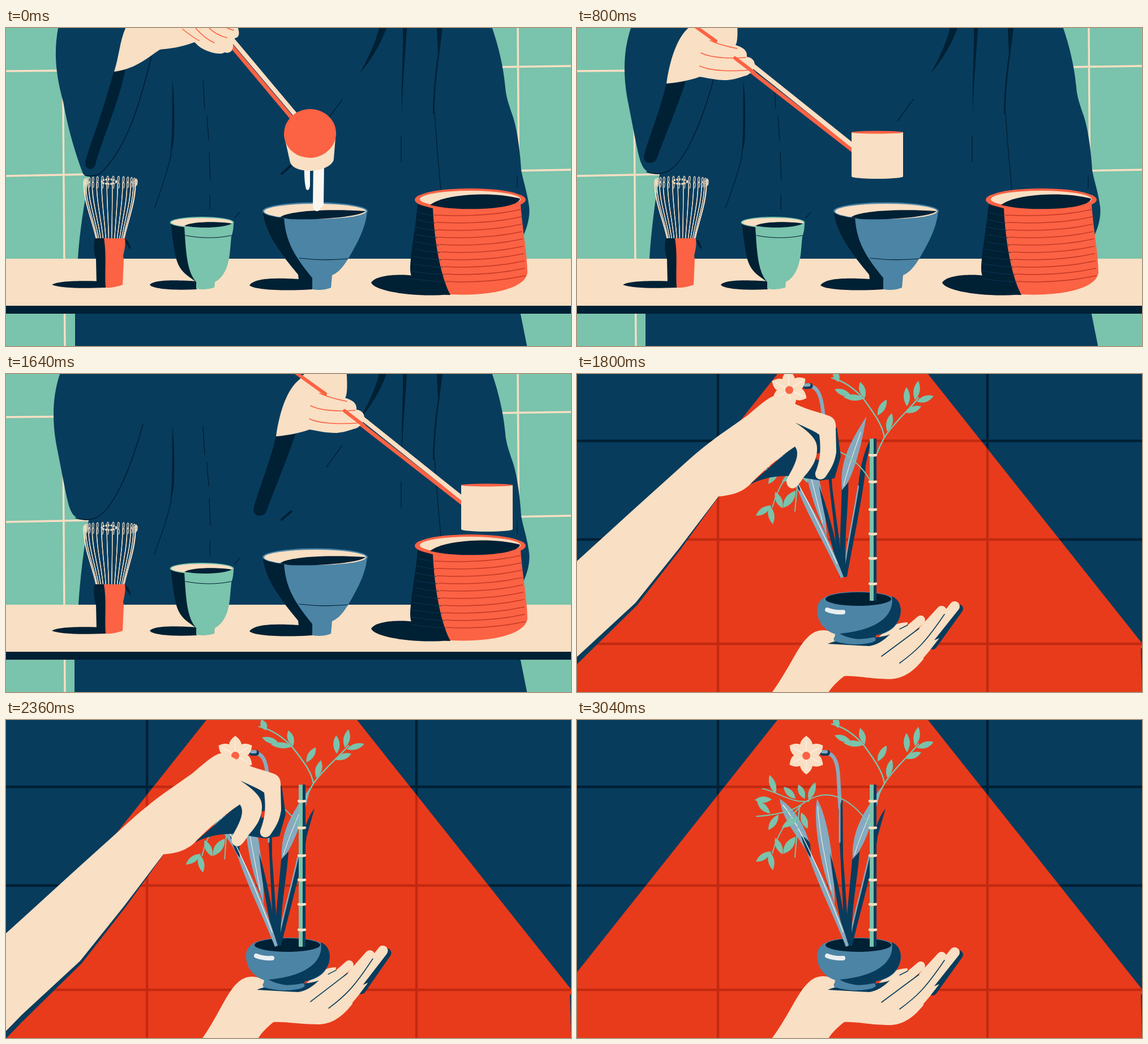
An HTML page for the animation above (3.32 s loop, 998 by 561 pixels).

```html
<!DOCTYPE html>
<html lang="en">
<head>
<meta charset="utf-8">
<title>Tea and flowers</title>
<style>
html, body { margin: 0; width: 100%; height: 100%; overflow: hidden; background: #073c5d; }
svg { display: block; width: 100vw; height: 100vh; }
</style>
</head>
<body>
<svg id="stage" viewBox="0 0 998 561"></svg>
<script>
const LOOP = 3320, CUT = 1720;
const C = {
  navy: '#073c5d', ink: '#002034', teal: '#7ac3ac', cream: '#f9dfc3', coral: '#fc6244',
  blue: '#4b84a5', pale: '#86aabf', red: '#e83b1c', brick: '#c22a10', white: '#fbf7f0'
};

// markup helpers
const fill = (d, color, id = '') => `<path id="${id}" d="${d}" fill="${color}"/>`;
const line = (d, color, w = 2, id = '') =>
  `<path id="${id}" d="${d}" fill="none" stroke="${color}" stroke-width="${w}" stroke-linecap="round" stroke-linejoin="round"/>`;
const oval = (x, y, rx, ry, color) => `<ellipse cx="${x}" cy="${y}" rx="${rx}" ry="${ry}" fill="${color}"/>`;
const group = (id, ...parts) => `<g id="${id}">${parts.join('')}</g>`;
const range = (n, f) => Array.from({ length: n }, (_, i) => f(i)).join('');

// motion helpers
const NUM = /-?\d+(\.\d+)?/g;
function mix(a, b, k) {
  const n = b.match(NUM);
  let i = 0;
  return a.replace(NUM, v => (+v + (n[i++] - v) * k).toFixed(2));
}
const smooth = k => k * k * (3 - 2 * k);
function track(keys, t) {
  if (t <= keys[0][0]) return keys[0].slice(1);
  for (let i = 1; i < keys.length; i++) {
    const [a, b] = [keys[i - 1], keys[i]];
    if (t <= b[0]) {
      const k = smooth((t - a[0]) / (b[0] - a[0]));
      return a.slice(1).map((v, j) => v + (b[j + 1] - v) * k);
    }
  }
  return keys[keys.length - 1].slice(1);
}

// ---------- tea table ----------
const robeRight = 'L922,570 L908,500 L912,370 C922,350 926,330 924,315 C921,290 912,265 910,250 C908,215 902,175 895,155 C888,135 883,120 882,105 C878,60 866,20 857,-5 Z';
// cup: mouth x y, axis angle, mouth rx ry, length, far end rx ry
const poses = [
  {
    robe: 'M93,-5 C84,40 87,80 101,130 C110,180 122,220 136,257 C140,262 145,262 147,262 C138,310 130,360 127,406 L122,500 L122,570 ',
    lining: 'M190,78 L211,72 C200,130 172,190 158,240 C156,251 142,252 140,240 C142,220 165,170 190,78Z',
    fold: 'M257,50 C240,115 222,200 168,256 C160,261 152,262 140,260',
    hand: 'M191,77 C200,50 201,20 213,-4 C230,-8 240,-10 252,-14 L406,-10 C414,8 413,17 404,18 C404,22 403,25 401,28 C402,40 396,46 386,43 C380,48 362,44 350,38 C342,34 338,30 333,25 C310,34 290,36 272,38 C250,52 230,72 191,77Z',
    lines: 'M312,2 C322,10 332,18 341,22 M333,-2 C345,12 358,22 368,26 M355,-4 C365,8 380,15 390,17 M375,-8 C385,-2 395,2 402,4',
    light: 'M396,16 L512,154', dark: 'M392,24 L506,160',
    cup: '537 186 86 46 43 46 39 20'
  },
  {
    robe: 'M90,-5 C82,40 86,80 101,140 C110,185 120,225 133,260 C138,264 143,265 146,266 C137,310 130,360 126,406 L119,500 L119,570 ',
    lining: 'M172,112 L191,109 C180,170 165,215 152,245 C150,258 134,258 134,242 C138,220 155,170 172,112Z',
    fold: 'M249,86 C235,140 215,210 170,260 C160,266 150,266 140,265',
    hand: 'M172,111 C182,70 182,18 212,12 C230,9 240,10 250,-4 L354,-8 C360,10 358,14 361,18 C367,30 368,45 361,47 C366,60 364,70 356,72 C360,84 350,90 340,87 C320,82 300,73 284,70 C265,90 245,98 225,99 C205,103 190,106 172,111Z',
    lines: 'M264,64 C272,68 278,71 286,73 M283,37 C300,48 335,52 341,72 M309,3 C325,12 348,20 355,42 M344,-2 C348,6 354,14 360,18',
    light: 'M358,46 L492,214', dark: 'M358,56 L486,220',
    cup: '512 259 -57 45 24 60 44 23'
  },
  {
    robe: 'M97,-5 C80,40 82,90 90,130 C100,180 106,215 112,235 C118,252 126,258 146,258 C137,310 131,360 128,406 L121,500 L121,570 ',
    lining: 'M163,96 L197,92 C185,130 160,190 146,228 C143,238 124,240 123,226 C128,200 150,150 163,96Z',
    fold: 'M242,88 C225,150 195,235 160,253 C150,258 135,258 123,254',
    hand: 'M163,96 C168,60 180,15 204,-4 C210,-12 216,-16 222,-24 L287,-24 C290,10 288,25 285,28 C300,33 306,38 305,49 C315,50 320,57 319,66 C315,75 308,82 300,83 C285,88 275,90 268,90 C250,90 235,86 222,84 C205,90 185,94 163,96Z',
    lines: 'M222,65 C240,74 280,75 312,72 M224,42 C245,52 275,52 303,50 M240,20 C255,27 272,31 287,34 M287,34 C287,34 288,34 288,34',
    light: 'M300,52 L494,207', dark: 'M285,53 L492,214',
    cup: '535.5 182 90 45.5 2.5 78 45.5 4'
  }
];

const tiles = line('M100,0 L104,561 M904,0 L906,300 M0,76 L120,75 M0,261 L150,258 M860,69 L998,67 M890,252 L998,250', C.cream, 3.4);
const robeFolds =
  fill('M659,0 H672 C660,32 645,56 625,80 C640,52 652,28 659,0Z M701,0 H708 C705,50 701,90 699,150 C698,90 702,40 701,0Z M761,0 H771 L765,48 C759,90 756,130 757,152 L754,150 C755,110 759,70 763,46Z', C.ink) +
  fill('M294,92 C298,130 298,170 296,202 L290,228 C295,190 293,140 294,92Z', C.ink) +
  line('M594,126 L566,164 M757,150 C760,200 765,250 768,286 M292,222 C285,255 274,285 262,318 M348,93 L351,142 M355,156 L358,198 M359,220 L361,268 M360,295 V320 M413,325 L404,335 M698,190 V236 M903,260 V282', C.ink, 1.3) +
  line('M487,257 L504,242', C.ink, 4);
const shelf = `<rect y="407" width="998" height="84" fill="${C.cream}"/><rect y="490" width="998" height="14" fill="${C.ink}"/>`;

const whisk =
  fill('M81,453 C95,445 140,446 176,447 V458 C140,459 100,460 81,453Z', C.ink) +
  range(30, i => {
    const a = i / 30 * 2 * Math.PI, c = Math.cos(a), y = 270 + 6 * Math.sin(a);
    const x = 183 + 46 * c, b = 184 + 25 * c;
    return line(`M${b},371 C${b + 8 * c},335 ${x + c},305 ${x},${y} q2,-6 3,0 q0,4 -1,7`, C.cream, 1.2);
  }) +
  `<ellipse cx="182" cy="271" rx="13" ry="4" fill="none" stroke="${C.cream}" stroke-width="3" stroke-dasharray="3 1.5"/>` +
  line('M209,372 L219,388 L214,376', C.ink, 3) +
  fill('M157,371 H178 V458 L160,453 L159,408 C155,395 154,384 157,371Z', C.ink) +
  fill('M173,371 H210 C212,384 208,396 207,402 L208,408 L206,453 Q190,459 176,458 C174,430 178,400 173,371Z', C.coral);

const cup =
  fill('M254,453 C262,443 310,445 337,447 V461 C300,463 260,461 254,453Z', C.ink) +
  fill('M290,343 C295,375 298,385 300,400 C305,430 322,438 336,448 V460 Q352,463 368,458 L369,448 C385,440 394,420 396,390 L398,368 C401,360 402,352 402,343Z', C.teal) +
  fill('M290,343 C295,375 297,390 300,404 C306,432 324,438 336,448 C320,430 318,400 315,350Z', C.ink) +
  oval(346, 343, 56.5, 10, C.teal) + oval(346, 343, 54, 8, C.cream) +
  fill('M315,349 C330,341 375,341 399,345 C385,353 340,354 315,349Z', C.ink) +
  line('M317,366 Q360,374 398,366', C.ink, 1.2);

const bowl =
  fill('M430,454 C440,440 480,441 518,443 L541,445 V461 C500,464 440,463 430,454Z', C.ink) +
  fill('M453,323 C458,368 492,405 516,435 L541,461 Q560,464 574,458 L576,436 C592,430 604,408 612,394 C628,366 636,345 638,323Z', C.blue) +
  fill('M453,323 C458,368 492,405 516,435 L517,444 L541,461 V441 C512,405 494,380 491,334Z', C.ink) +
  oval(546, 323, 93, 15.5, C.blue) + oval(546, 323.5, 90, 13.5, C.cream) +
  fill('M484,334 C500,322 570,319 635,323 C630,331 560,340 500,337Z', C.ink) +
  line('M518,406 Q560,411 604,407', C.ink, 1.2);

const potRings = range(10, i => {
  const y = 329 + i * 13;
  return line(`M${727 - i * 1.2},${y - 4} Q740,${y} ${755 + i * 2.4},${y + 2}`, '#0a3450', 1.1) +
    line(`M${757 + i * 2.4},${y + 1} Q850,${y + 5} ${909 + i * .9},${y - 9}`, '#c63a24', 1.5);
});
const pot =
  fill('M645,449 C655,434 700,434 722,437 L785,470 C720,476 650,464 645,449Z', C.ink) +
  fill('M728,310 C725,350 715,400 715,425 C715,452 740,468 785,470 C850,473 916,462 921,432 C921,400 912,355 909,310Z', C.coral) +
  fill('M727,310 C724,350 714,400 714,425 C714,453 740,469 785,471 C768,440 757,380 754,318Z', C.ink) +
  potRings + oval(820, 303, 98, 20, C.coral) + oval(820, 302, 89, 15, C.cream) +
  fill('M749,312 C775,292 860,288 908,301 C905,322 790,324 749,312Z', C.ink);

const teaScene = group('tea',
  `<rect width="998" height="561" fill="${C.teal}"/>`, tiles, fill('', C.navy, 'robe'), robeFolds,
  line('', C.ink, 1.6, 'fold'), fill('', C.ink, 'lining'),
  shelf, whisk, cup, bowl, pot,
  `<clipPath id="above"><path d="M450,200 H640 V322 Q550,327 450,322Z"/></clipPath>`,
  `<g clip-path="url(#above)">${group('water', fill('M527,235 H537 V278 Q535,290 530,284 Q526,270 527,235Z M543,235 H562 L561,312 Q556,316 553,322 Q546,326 542,316Z', C.white))}</g>`,
  group('drops', range(3, () => `<circle r="1.4" fill="${C.white}"/>`)),
  group('ladle',
    line('', C.coral, 7, 'dark'), line('', C.cream, 8, 'light'),
    fill('', C.cream, 'hand'), line('', C.coral, 1.6, 'lines'),
    group('grip', line('M190,-22 L250,21', C.coral, 6), line('M284,51 L318,77', C.coral, 6)),
    group('scoop', fill('', C.cream, 'side'), `<ellipse id="mouth" fill="${C.coral}"/>`)));

// ---------- flower pot ----------
function leaf(x1, y1, x2, y2, w = 11) {
  const mx = (x1 + x2) / 2, my = (y1 + y2) / 2, l = Math.hypot(x2 - x1, y2 - y1);
  const nx = (y2 - y1) / l * w, ny = (x1 - x2) / l * w;
  return fill(`M${x1},${y1} Q${mx + nx},${my + ny} ${x2},${y2} Q${mx - nx},${my - ny} ${x1},${y1}Z`, C.teal);
}
const leaves = s => s.split(' ').map(p => leaf(...p.split(',').map(Number))).join('');
const grid = 'M249,0 V561 M725,0 V561 M0,118 H998 M0,292 H998 M0,476 H998';
const tent = 'M354,0 H620 L998,475 V561 H0 V445Z';
const room = `<rect width="998" height="561" fill="${C.navy}"/>` + line(grid, C.ink, 4.5) +
  `<clipPath id="tent"><path d="${tent}"/></clipPath>` + fill(tent, C.red) +
  `<g clip-path="url(#tent)">${line(grid, C.brick, 4.5)}</g>` + fill('M996,484 H998 V561Z', C.navy);

const palm = group('palm',
  line('M628,478 L674,414', C.navy, 16),
  fill('M344,562 C372,525 390,480 408,464 C425,447 445,450 465,462 L525,472 C545,452 560,438 584,438 L583,446 L600,455 L612,503 C590,530 570,540 545,538 C515,537 490,532 472,533 C460,542 450,552 444,562Z', C.cream),
  line('M555,478 L607,434', C.cream, 16), line('M575,493 L644,418', C.cream, 18), line('M600,494 L667,410', C.cream, 18),
  fill('M600,515 L622,489 L640,466 L605,480Z', C.cream),
  line('M538,498 L604,449', C.navy, 1.6), line('M570,510 C600,488 615,474 649,424', C.navy, 1.6), line('M570,450 L584,443', C.navy, 1.4));

const planter =
  fill('M443,476 C470,463 530,470 553,459 C542,470 530,478 516,480Z', C.navy) +
  fill('M424,416 C424,396 442,384 497,384 C556,384 572,398 572,418 C570,446 550,458 528,461 L523,473 Q490,482 454,471 L456,459 C436,452 424,436 424,416Z', C.blue) +
  fill('M556,392 C562,426 530,452 464,458 C480,468 512,470 525,471 L528,461 C552,456 572,442 572,416 C571,404 566,396 556,392Z', C.navy) +
  line('M457,467 Q490,475 524,468', C.blue, 7) +
  oval(497, 397, 58, 12, C.ink) + line('M442,416 Q455,421 470,420', '#e9eef0', 8);

const petals = range(6, i =>
  `<g transform="translate(405 62) rotate(${i * 60})">${fill('M0,0 C-12,-10 -17,-22 0,-34 C17,-22 12,-10 0,0Z', C.cream)}${line('M0,-8 V-26', C.white, 1.2)}</g>`);
const plant = group('plant',
  fill('M424,139 C417,175 428,240 441,282 L455,325 C455,250 444,175 424,139Z', C.pale) +
  fill('M447,235 C452,290 465,350 474,398 L479,398 C472,340 462,285 447,235Z', C.navy) +
  line('M425,152 C428,200 440,250 449,300', C.white, 1),
  line('M438,58 C456,58 461,78 462,105 L465,160', C.pale, 6.5),
  fill('M462,158 L469,138 L470,240 L481,398 L473,398 C469,300 464,230 462,158Z', C.navy) + line('M464,140 V215', C.pale, 3),
  fill('M545,156 C532,172 524,200 518,228 C508,290 488,340 480,398 H486 C500,340 528,240 531,205Z', C.navy),
  line('M516,240 C505,290 492,335 484,374', C.pale, 2.5),
  fill('M538,118 C512,155 484,190 487,247 C506,226 522,185 538,118Z', C.pale),
  fill('M486,246 C482,300 474,350 476,398 H485 C484,330 496,280 499,232Z', C.navy) + line('M526,145 C512,180 500,205 490,238', C.white, 1),
  fill('M358,139 C382,154 400,182 409,212 L414,238 C440,285 462,340 480,398 L475,400 C458,355 430,300 410,243 C400,212 364,186 358,139Z', C.pale),
  fill('M396,205 C404,207 411,214 412,220 L413,243 C404,232 400,218 396,205Z', C.navy), line('M364,150 C398,192 434,280 470,374', C.white, 1.2),
  line('M434,58 H442', C.navy, 10), line('M434,56 H440', C.pale, 6), petals, `<circle cx="405" cy="63" r="7" fill="${C.coral}"/>`);

const leftBranch = group('left-branch',
  line('M517,186 C500,159 472,133 440,132 C412,133 400,150 380,158 C360,165 335,169 317,170 M410,143 C380,148 355,127 328,121 M395,152 C375,172 356,195 345,235 M393,151 C390,190 387,215 385,242', C.teal, 2),
  leaves('340,97,351,130 314,141,344,140 318,143,341,165 365,118,386,139 391,114,402,139 421,110,409,141 356,167,338,194 396,163,407,192 350,208,363,237 386,206,364,236,14 343,232,316,250 340,232,346,265 362,190,390,172'));
const rightBranch = group('right-branch',
  line('M530,140 C535,125 540,118 543,112 C560,85 590,60 603,42 M543,112 C540,90 525,70 507,45 C490,25 470,12 450,7', C.teal, 2.4),
  leaves('548,102,556,69 531,73,547,45 583,57,582,23 597,46,603,12 600,49,630,39 580,68,608,57 508,43,500,14 455,27,484,38 470,40,508,43 462,14,454,-6'));
const bamboo = `<rect x="517" y="114" width="12" height="286" fill="${C.teal}"/><rect x="524" y="114" width="5" height="286" fill="${C.navy}"/>` +
  [143, 190, 239, 282, 325, 370].map(y => line(`M517,${y} Q523,${y + 1} 528,${y}`, C.cream, 4.5)).join('');

// gripping and released hand
const shade = [
  'M305,195 C340,178 365,180 380,180 L430,188 L455,184 L466,145 L459,95 L385,80 L380,130Z',
  'M322,186 C350,172 382,174 410,182 L446,184 L468,190 L491,176 L455,88 L385,80 L380,130Z'
];
const fist = [
  'M-300,600 L0,330 L100,239 L200,149 C215,136 232,122 250,109 L300,74 C322,56 336,42 350,38 C362,38 375,46 388,54 C405,62 425,67 440,72 C455,76 458,84 457,97 L458,138 C455,158 448,168 440,180 C434,190 419,187 421,174 C428,155 432,140 428,107 C418,100 408,96 386,86 C410,102 424,115 424,130 C425,150 415,166 402,180 C396,188 392,196 386,200 C377,206 367,196 371,185 C382,165 396,142 385,128 C355,148 330,170 310,190 C295,208 275,214 250,216 L180,308 L103,404 L0,499 L-300,806Z',
  'M-300,600 L0,330 L100,246 L200,155 C215,140 232,124 250,110 L300,68 C322,49 336,38 350,38 C362,38 375,44 388,50 C405,60 425,69 440,76 C455,84 457,92 460,104 C466,116 464,126 462,140 C459,160 456,170 453,180 C448,189 436,186 439,174 C443,155 446,136 433,116 C424,108 410,102 390,92 C412,104 426,118 426,134 C426,152 416,164 408,177 C403,188 402,196 397,199 C388,202 386,192 389,184 C394,168 400,144 386,129 C360,140 340,156 322,178 C306,202 285,216 256,218 L180,312 L103,406 L0,499 L-300,806Z'
];
const arm = group('arm',
  fill('', C.navy, 'shade'), fill('M252,214 L184,308 L106,408 L0,512 L-300,822 L-300,790Z', C.navy),
  fill('M422,141 L433,138 L430,150 L423,152Z', C.red), fill('', C.cream, 'fist'));

const flowerScene = group('flower', room, palm, planter, plant, leftBranch, rightBranch, bamboo, arm);

document.getElementById('stage').innerHTML = teaScene + flowerScene;
const el = id => document.getElementById(id);
const move = (id, x, y, more = '') => el(id).setAttribute('transform', `translate(${x} ${y}) ${more}`);
const show = (id, on) => el(id).setAttribute('visibility', on ? 'inherit' : 'hidden');

const poseKeys = [[40, 0], [560, 1], [800, 2]];
const slideKeys = [[600, 0, 0], [800, -5, 2], [1160, -5, 2], [1320, 0, 0], [1640, 314, 14]];
const armKeys = [[1680, -30, -36], [1800, 0, 0], [2200, 28, 20], [2360, 28, 21], [2480, 20, 14], [2720, -103, -26], [2800, -180, -27], [2880, -250, -28], [3000, -430, -40]];
const openKeys = [[2440, 0], [2720, 1]];
const plantKeys = [[1680, 1.7], [1800, 1], [2160, 0]];
const swayKeys = [[2080, 0], [2240, 3], [2360, 4], [2560, -1], [2720, 0]];

function drawTea(t) {
  const [p] = track(poseKeys, t), i = Math.min(1, Math.floor(p)), k = p - i;
  const part = name => mix(poses[i][name], poses[i + 1][name], k);
  for (const id of ['lining', 'fold', 'hand', 'lines', 'light', 'dark']) el(id).setAttribute('d', part(id));
  el('robe').setAttribute('d', part('robe') + robeRight);
  const [x, y, turn, rx, ry, len, ex, ey] = part('cup').split(' ').map(Number);
  move('scoop', x, y, `rotate(${turn - 90})`);
  el('side').setAttribute('d', `M${-rx},0 L${-ex},${len} A${ex},${ey} 0 0 0 ${ex},${len} L${rx},0Z`);
  el('mouth').setAttribute('rx', rx);
  el('mouth').setAttribute('ry', ry);
  const [dx, dy] = track(slideKeys, t);
  move('ladle', dx, dy);
  move('lining', dx, dy);
  show('grip', p > 1.6);
  const fall = t / 1000;
  move('water', 0, 900 * fall * fall + 120 * fall);
  show('water', t < 360);
  // splash arcs
  const s = (t - 560) / 1000;
  [[690, 290, 260], [674, 321, 220], [598, 334, 90]].forEach(([cx, cy, v], n) => {
    const c = el('drops').children[n];
    c.setAttribute('cx', cx + v * s);
    c.setAttribute('cy', cy + 60 * s + 500 * s * s);
  });
  show('drops', t >= 400 && t < 600);
}

function drawFlower(t) {
  const [ax, ay] = track(armKeys, t), [open] = track(openKeys, t);
  const [lift] = track(plantKeys, t), [sway] = track(swayKeys, t);
  move('arm', ax, ay);
  show('arm', t < 3040);
  el('shade').setAttribute('d', mix(...shade, open));
  el('fist').setAttribute('d', mix(...fist, open));
  move('plant', -9 * lift, -40 * lift, `rotate(${-3.6 * lift} 479 400)`);
  move('left-branch', 0, 0, `rotate(${-sway * .35} 517 185)`);
  move('right-branch', 543, 112, `scale(${1 + sway * .008} ${1 - sway * .011}) translate(-543 -112)`);
  move('palm', 0, 0, `rotate(${-sway * .22} 470 500)`);
}

function draw(now) {
  const t = Math.floor(now % LOOP / 40) * 40;
  show('tea', t < CUT);
  show('flower', t >= CUT);
  if (t < CUT) drawTea(t); else drawFlower(t);
}
const start = performance.now();
function tick() {
  draw(performance.now() - start);
  requestAnimationFrame(tick);
}
tick();
</script>
</body>
</html>
```
